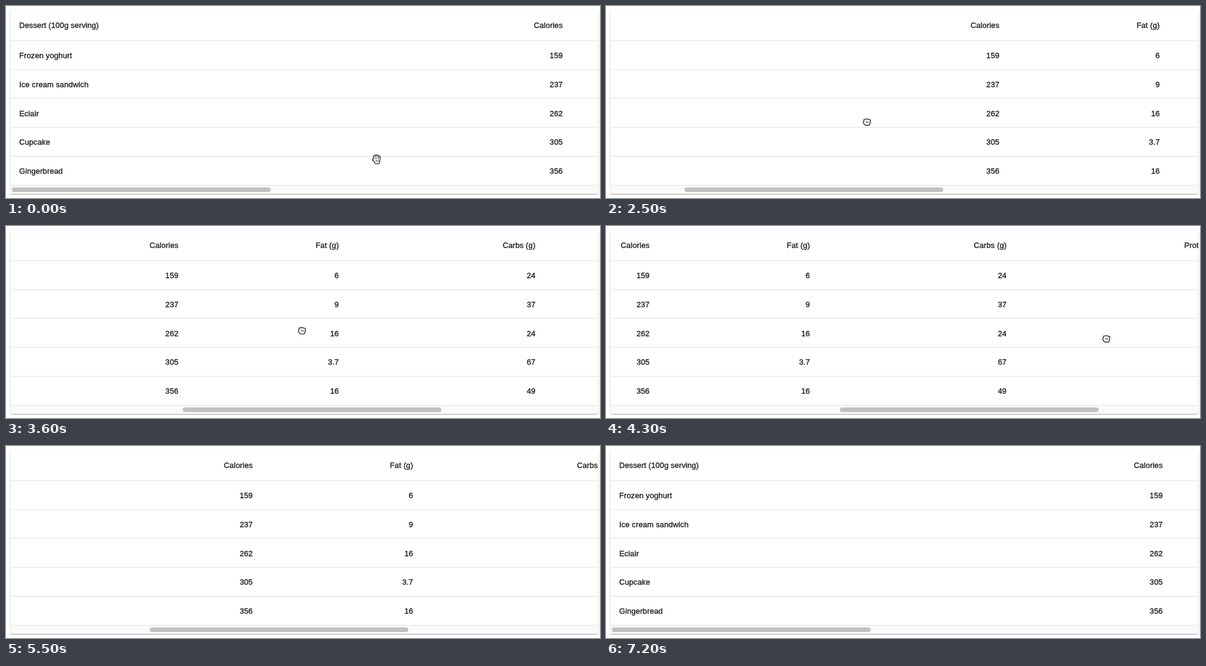
Write an HTML page with a canvas that moves like this. It is 1000 px wide and 324 px high and loops after 7.7 s.

```html
<!DOCTYPE html>
<html lang="en">
<head>
<meta charset="utf-8">
<title>Draggable table</title>
<style>
  html, body { margin: 0; width: 100%; height: 100%; overflow: hidden; background: #fff; }
  canvas { display: block; width: 1000px; height: 324px; }
</style>
</head>
<body>
<canvas id="stage"></canvas>
<script>
const W = 1000, H = 324, LOOP = 7700, STEP = 100;
const CARD = { x: 7.5, y: 6, w: 990, h: 310.9, r: 4 };
const ROW_H = 48.86, HEAD_LINE = 57.8;
const THUMB = { x: 10, y: 306.3, w: 435.5, h: 7.6, ratio: 0.4445 };

const canvas = document.getElementById('stage');
const ctx = canvas.getContext('2d');
const dpr = window.devicePixelRatio || 1;
canvas.width = W * dpr;
canvas.height = H * dpr;

const columns = [
  { x: 22.2, align: 'left', cells: ['Dessert (100g serving)', 'Frozen yoghurt', 'Ice cream sandwich', 'Eclair', 'Cupcake', 'Gingerbread'] },
  { x: 937.3, align: 'right', cells: ['Calories', '159', '237', '262', '305', '356'] },
  { x: 1207.3, align: 'right', cells: ['Fat (g)', '6', '9', '16', '3.7', '16'] },
  { x: 1538.3, align: 'right', cells: ['Carbs (g)', '24', '37', '24', '67', '49'] },
  { x: 1899.3, align: 'right', cells: ['Protein (g)', '4', '4.3', '6', '4.3', '3.9'] }
];

const move = (from, to, ...goal) => ({ from, to, goal });

// Goals: scroll offset
const scrolls = [
  move(1800, 2480, 275),
  move(3000, 3916, 788),
  move(4080, 4790, 1120),
  move(4800, 5695, 439),
  move(5740, 7200, 0)
];

// Goals: pointer x, y
const handStart = [624, 258.5];
const handMoves = [
  move(0, 200, 650, 220.5),
  move(700, 900, 659, 218),
  move(1300, 1600, 697, 208.5),
  move(1700, 2500, 439, 195.5),
  move(2500, 3000, 870, 180),
  move(3000, 3916, 357, 175),
  move(3916, 4080, 918, 190)
];

// While dragging, pointer x + scroll stays at the anchor
const drags = [
  { from: 1800, to: 2500, anchor: 714 },
  { from: 3000, to: 3916, anchor: 1145 },
  { from: 4080, to: LOOP, anchor: 1706 }
];

function follow(start, moves, t) {
  let value = start;
  for (const { from, to, goal } of moves) {
    const u = Math.min(1, Math.max(0, (t - from) / (to - from)));
    const k = u * u * (3 - 2 * u);
    value = value.map((v, i) => v + (goal[i] - v) * k);
  }
  return value;
}

function roundRect({ x, y, w, h, r }) {
  ctx.beginPath();
  ctx.roundRect(x, y, w, h, r);
}

function shadow(blur, dy, alpha) {
  ctx.save();
  ctx.shadowColor = `rgba(0,0,0,${alpha})`;
  ctx.shadowBlur = blur * dpr;
  ctx.shadowOffsetY = dy * dpr;
  ctx.fillStyle = '#fff';
  roundRect(CARD);
  ctx.fill();
  ctx.restore();
}

function drawTable(scroll) {
  shadow(3, 1, 0.2);
  shadow(1, 1, 0.2);
  ctx.save();
  roundRect(CARD);
  ctx.clip();

  ctx.fillStyle = '#fafafa';
  ctx.fillRect(CARD.x, 302.5, CARD.w, 16);
  ctx.fillStyle = '#dedede';
  for (let i = 0; i < 6; i++) {
    ctx.fillRect(CARD.x, HEAD_LINE + i * ROW_H, CARD.w, 1);
  }
  ctx.fillStyle = '#c1c1c1';
  roundRect({ ...THUMB, x: THUMB.x + scroll * THUMB.ratio, r: 3.8 });
  ctx.fill();

  ctx.font = '12.95px "Liberation Sans", Helvetica, Arial, sans-serif';
  ctx.letterSpacing = '0.14px';
  ctx.fillStyle = ctx.strokeStyle = '#212121';
  ctx.lineWidth = 0.4;
  for (const { x, align, cells } of columns) {
    ctx.textAlign = align;
    cells.forEach((text, row) => {
      const y = row ? 87.8 + (row - 1) * ROW_H : 36.6;
      ctx.fillText(text, x - scroll, y);
      ctx.strokeText(text, x - scroll, y);
    });
  }
  ctx.restore();
}

const openHand = { left: -4, gap: 2.95, top: -5.9, arch: 0.8, base: 6.2, thumb: -5.6, line: 2, tick: 1.8 };
const fist = { left: -3.1, gap: 2.5, top: -3.2, arch: 0.35, base: 4, thumb: -4.2, line: 2.6, tick: -0.6 };

function drawHand(x, y, hand) {
  const { left, gap, top, arch, base, thumb, line, tick } = hand;
  ctx.save();
  ctx.translate(x, y);
  ctx.lineCap = ctx.lineJoin = 'round';
  for (const [color, width] of [['#000', line + 2.2], ['#fff', line]]) {
    ctx.strokeStyle = ctx.fillStyle = color;
    ctx.lineWidth = width;
    ctx.beginPath();
    ctx.moveTo(thumb, 0.8);
    ctx.lineTo(-2.4, 3.2);
    for (let i = 0; i < 4; i++) {
      const tip = left + i * gap;
      ctx.moveTo(tip, top + arch * (i - 1.2) ** 2);
      ctx.lineTo(tip * 0.8, 1.5);
    }
    ctx.stroke();
    ctx.beginPath();
    ctx.moveTo(-3, 1.5);
    ctx.lineTo(4, 1.5);
    ctx.lineTo(3, base);
    ctx.lineTo(-1.6, base);
    ctx.closePath();
    ctx.fill();
    ctx.stroke();
  }
  ctx.strokeStyle = '#000';
  ctx.lineWidth = 0.7;
  ctx.beginPath();
  for (let dx = -1; dx <= 3; dx += 2) {
    ctx.moveTo(dx, tick);
    ctx.lineTo(dx, tick + 2.2);
  }
  ctx.stroke();
  ctx.restore();
}

function draw(t) {
  const [scroll] = follow([0], scrolls, t);
  const [freeX, y] = follow(handStart, handMoves, t);
  const drag = drags.find(d => t >= d.from && t <= d.to);
  ctx.setTransform(dpr, 0, 0, dpr, 0, 0);
  ctx.fillStyle = '#fff';
  ctx.fillRect(0, 0, W, H);
  drawTable(scroll);
  if (drag) drawHand(drag.anchor - scroll, y, fist);
  else drawHand(freeX, y, openHand);
}

const start = performance.now();
function frame() {
  const t = (performance.now() - start) % LOOP;
  draw(Math.floor(t / STEP) * STEP);
  requestAnimationFrame(frame);
}
frame();
</script>
</body>
</html>
```
